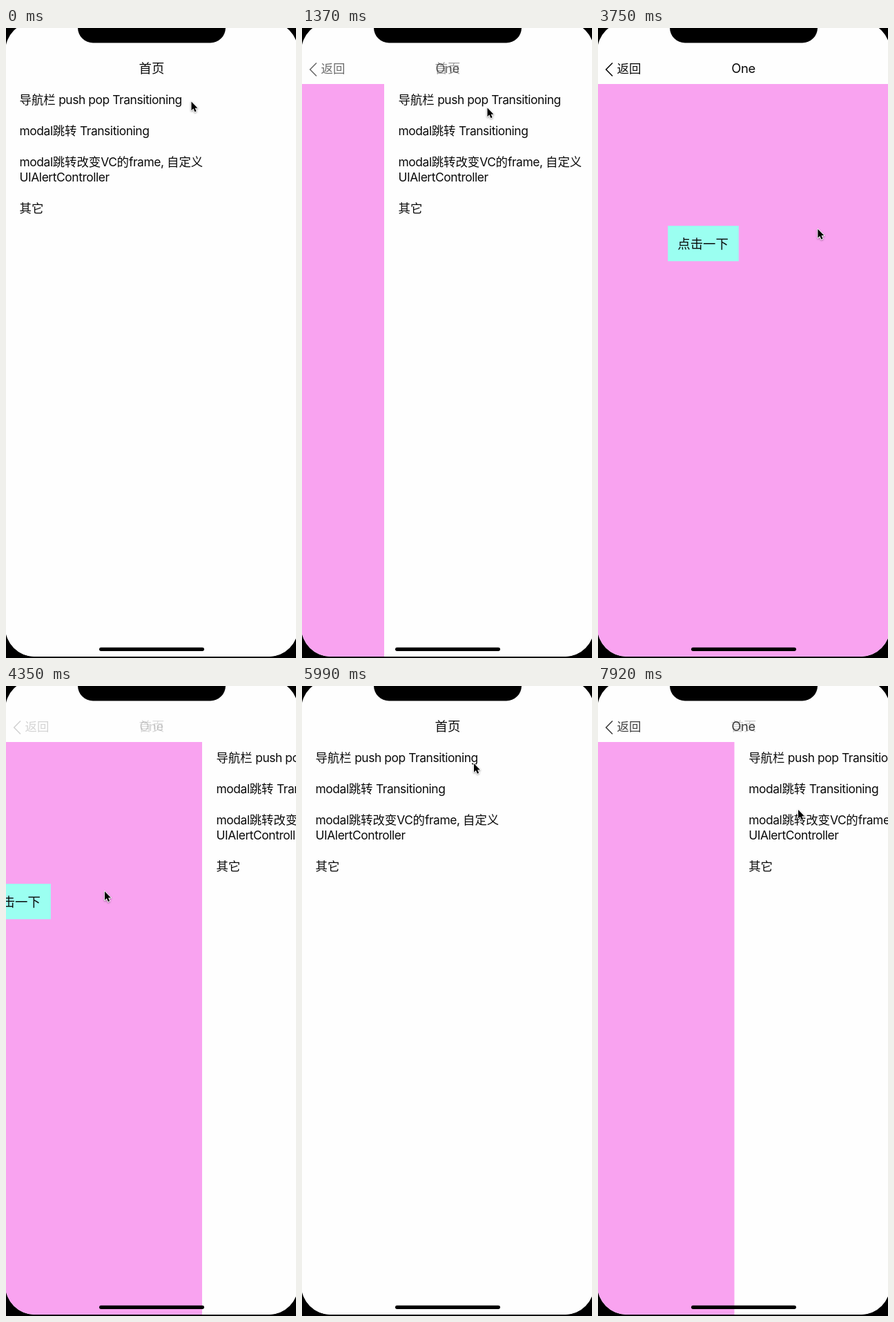
An HTML page with a canvas for the animation above (8000 ms loop, 420x911 px).

```html
<!DOCTYPE html>
<html lang="zh">
<head>
<meta charset="utf-8">
<title>Transition</title>
<style>
html, body { margin: 0; width: 100%; height: 100%; overflow: hidden; background: #000; }
canvas { display: block; width: 420px; height: 911px; }
</style>
</head>
<body>
<canvas id="stage"></canvas>
<script>
const W = 420, H = 911, LOOP = 8000;
const FONT = 'Inter, "Noto Sans CJK SC", "Noto Sans CJK", sans-serif';
const WHITE = '#fefefe', INK = '#0a0a0a', PINK = '#f9a3f0', AQUA = '#9bfff1';

// The phone screen is slightly larger than the stage.
const LEFT = -1, TOP = -9, PHONE_W = 424, PHONE_H = 918, RADIUS = 42.5;
const NAV = 81;

const canvas = document.getElementById('stage');
const ctx = canvas.getContext('2d');
const dpr = window.devicePixelRatio || 1;
canvas.width = W * dpr;
canvas.height = H * dpr;

const clamp = v => Math.max(0, Math.min(1, v));
const mix = (a, b, u) => a + (b - a) * u;

// cubic-bezier(.42, 0, .58, 1)
function ease(x) {
  if (x <= 0 || x >= 1) return clamp(x);
  let lo = 0, hi = 1, s = 0.5;
  for (let i = 0; i < 24; i++) {
    s = (lo + hi) / 2;
    const v = 1.26 * s * (1 - s) ** 2 + 1.74 * s * s * (1 - s) + s ** 3;
    if (v < x) lo = s; else hi = s;
  }
  return s * s * (3 - 2 * s);
}

const STEP = 148.8, FIRST = 480;
const sample = t => FIRST + STEP * Math.floor((t + 8 - FIRST) / STEP);

const PUSH_TIME = 1980, PUSHES = [643, 6966];
const DRAG = 3650, RELEASE = 4360, FINISH = 1530, HELD = 0.3974;

// time, x, y of the pointer tip
const POINTER = [
  [0, 268.5, 106.5], [400, 268.5, 106.5], [640, 268.5, 115], [1400, 268.5, 115.5],
  [2090, 301, 286], [2600, 301, 290], [2720, 301, 290], [3000, 327, 290.5],
  [DRAG, 327, 290.5], [4330, 143, 297], [4480, 142.5, 298.5], [5260, 142.5, 298.5],
  [5820, 249, 112], [7100, 249, 112], [7900, 290, 179], [8000, 290, 179]
];

function pointerAt(t) {
  const i = Math.max(1, POINTER.findIndex(k => k[0] > t));
  const [t0, x0, y0] = POINTER[i - 1], [t1, x1, y1] = POINTER[i];
  const u = ease((t - t0) / (t1 - t0));
  return [mix(x0, x1, u), mix(y0, y1, u)];
}

function popProgress(t) {
  if (t < RELEASE) {
    return Math.min(HELD, Math.max(0, (310 - pointerAt(t)[0]) / W));
  }
  return mix(HELD, 1, ease((t - RELEASE) / FINISH));
}

function poseAt(t) {
  if (t >= DRAG && t < 6500) {
    const u = popProgress(t);
    return {
      shift: 1 - ease(u), glow: 0,
      one: clamp(1 - u / 0.48), home: clamp((u - 0.32) / 0.56)
    };
  }
  const start = PUSHES[t < DRAG ? 0 : 1];
  const u = clamp((t - start) / PUSH_TIME);
  return {
    shift: ease(u),
    glow: t < start - 16 ? 0 : 1 - ease((t - start) / 500),
    one: clamp(u / 0.62), home: clamp(1 - u / 0.6)
  };
}

function box(x, y, w, h, color) {
  ctx.fillStyle = color;
  ctx.fillRect(x, y, w, h);
}

function pill(x, y, w, h, r, color) {
  ctx.fillStyle = color;
  ctx.beginPath();
  ctx.roundRect(x, y, w, h, r);
  ctx.fill();
}

// Latin runs are set tighter than Chinese ones.
function write(text, x, y, size = 17.4) {
  ctx.fillStyle = INK;
  ctx.font = `400 ${size}px ${FONT}`;
  for (const run of text.match(/[\x00-\xff]+|[^\x00-\xff]+/g)) {
    ctx.letterSpacing = run.charCodeAt(0) < 256 ? '-0.42px' : '0px';
    ctx.fillText(run, x, y);
    x += ctx.measureText(run).width;
  }
}

function drawList(x, glow) {
  box(x, NAV, PHONE_W, H - NAV, WHITE);
  if (glow > 0) {
    ctx.globalAlpha = glow;
    box(x, NAV, PHONE_W, 45, '#3a3a3c');
    ctx.globalAlpha = 1;
    box(x + 16, 125.4, 393, 0.6, WHITE);
  }
  const left = x + 20.5;
  write('导航栏 push pop Transitioning', left, 110);
  write('modal跳转 Transitioning', left, 155);
  write('modal跳转改变VC的frame, 自定义', left, 199.7);
  write('UIAlertController', left, 222);
  write('其它', left, 267);
}

function drawDetail(x) {
  box(x, NAV, PHONE_W, H - NAV, PINK);
  box(x + 102.2, 286, 102.6, 51.2, AQUA);
  write('点击一下', x + 116.3, 318.5, 18.4);
}

function drawNav(one, home) {
  ctx.globalAlpha = home;
  write('首页', 192.6, 65.3, 18.4);
  ctx.globalAlpha = one;
  write('One', 193.3, 65.2, 18.4);
  write('返回', 27.6, 65);
  ctx.strokeStyle = INK;
  ctx.lineWidth = 1.6;
  ctx.beginPath();
  ctx.moveTo(21, 50.5);
  ctx.lineTo(11.7, 60);
  ctx.lineTo(21, 69.5);
  ctx.stroke();
  ctx.globalAlpha = 1;
}

const arrow = new Path2D('M0 0V14.6L3.3 11.5L5.7 17L8.2 15.9L5.9 10.6H10.3Z');

function drawPointer([x, y]) {
  ctx.save();
  ctx.translate(x, y);
  ctx.scale(0.87, 0.87);
  ctx.lineJoin = 'round';
  ctx.lineWidth = 2;
  ctx.strokeStyle = '#fff';
  ctx.shadowColor = 'rgba(0,0,0,.4)';
  ctx.shadowBlur = 2.5 * dpr;
  ctx.shadowOffsetY = dpr;
  ctx.stroke(arrow);
  ctx.shadowColor = 'transparent';
  ctx.fillStyle = '#000';
  ctx.fill(arrow);
  ctx.restore();
}

function draw(t) {
  const pose = poseAt(t);
  const edge = LEFT + PHONE_W * pose.shift;
  ctx.setTransform(dpr, 0, 0, dpr, 0, 0);
  box(0, 0, W, H, '#000');
  ctx.save();
  ctx.beginPath();
  ctx.roundRect(LEFT, TOP, PHONE_W, PHONE_H, RADIUS);
  ctx.clip();
  box(0, 0, W, H, WHITE);
  if (pose.shift > 0) drawDetail(edge - PHONE_W);
  if (pose.shift < 1) drawList(edge, pose.glow);
  drawNav(pose.one, pose.home);
  ctx.restore();
  pill(104, -40, 214, 61.5, 22, '#000');
  pill(135, 895.7, 152, 5.2, 2.6, '#000');
  drawPointer(pointerAt(t));
}

const begin = performance.now();
function tick() {
  draw(Math.max(0, sample((performance.now() - begin) % LOOP)));
  requestAnimationFrame(tick);
}
tick();
</script>
</body>
</html>
```
